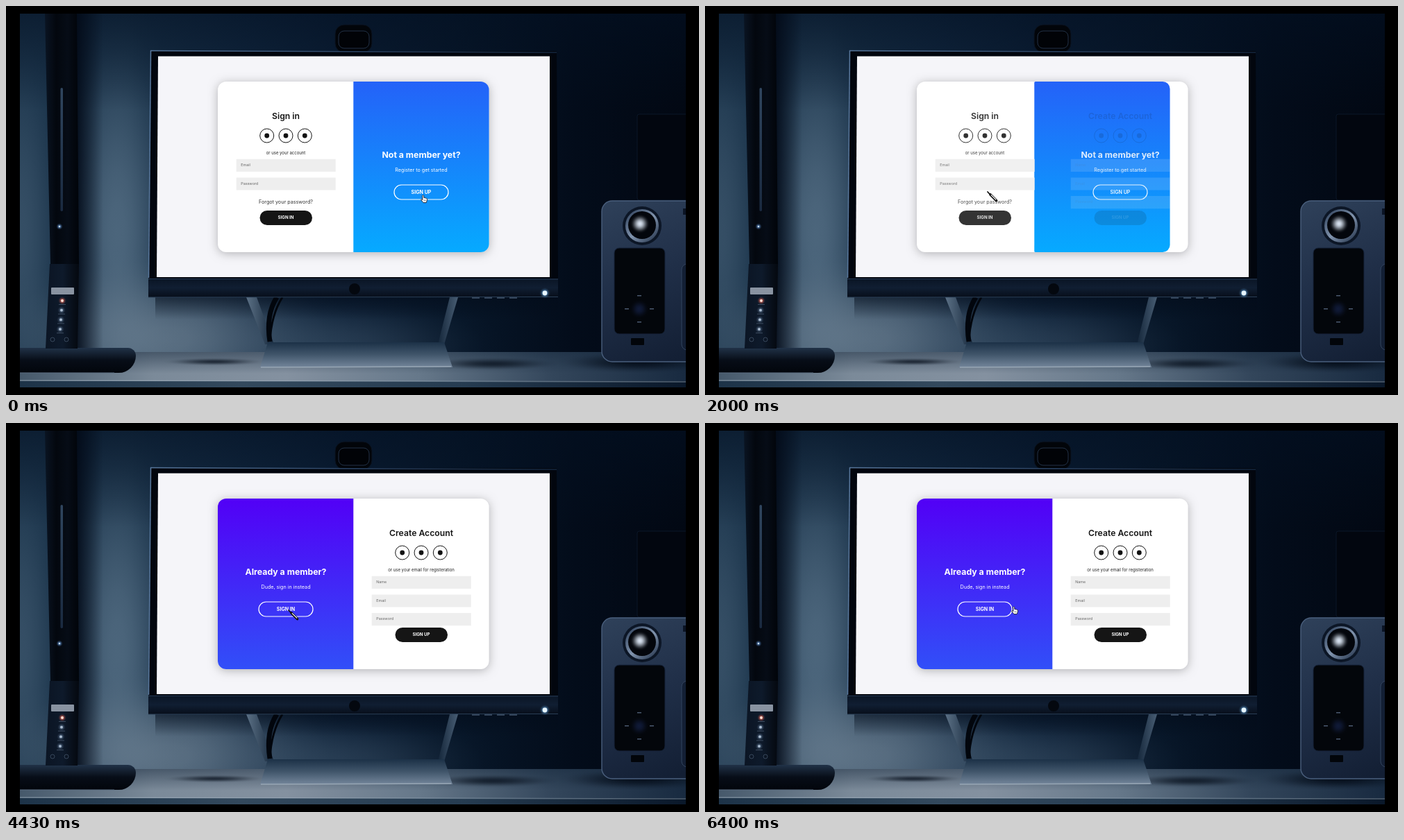
Animation, 998 px wide and 561 px high, one loop 6.43 s. Source, as an HTML page with a canvas:

```html
<!DOCTYPE html>
<html lang="en">
<head>
<meta charset="utf-8">
<title>Sign in / sign up</title>
<style>
html, body { margin: 0; width: 100%; height: 100%; overflow: hidden; background: #000; }
canvas { display: block; width: 998px; height: 561px; }
</style>
</head>
<body>
<canvas id="stage" width="998" height="561"></canvas>
<script>
const W = 998, H = 561, LOOP = 6430, SLIDE = 240;
const ctx = document.getElementById('stage').getContext('2d');
const room = document.createElement('canvas');
room.width = W;
room.height = H;
const g = room.getContext('2d');

// ---------- helpers ----------
function linear(c, x0, y0, x1, y1, ...colors) {
  const grad = c.createLinearGradient(x0, y0, x1, y1);
  colors.forEach((color, i) => grad.addColorStop(i / (colors.length - 1), color));
  return grad;
}
const across = (x0, x1, ...colors) => linear(g, x0, 0, x1, 0, ...colors);
const down = (y0, y1, ...colors) => linear(g, 0, y0, 0, y1, ...colors);

function box(c, fill, x, y, w, h, r = 0) {
  c.beginPath();
  c.roundRect(x, y, w, h, r);
  c.fillStyle = fill;
  c.fill();
}

function outline(c, color, width = 1) {
  c.strokeStyle = color;
  c.lineWidth = width;
  c.stroke();
}

function dot(c, fill, x, y, r) {
  c.beginPath();
  c.arc(x, y, r, 0, 7);
  c.fillStyle = fill;
  c.fill();
}

function line(c, color, width, x0, y0, x1, y1) {
  c.beginPath();
  c.moveTo(x0, y0);
  c.lineTo(x1, y1);
  outline(c, color, width);
}

// four-sided shape with level top and bottom edges
function slab(fill, top, l0, r0, bottom, l1, r1) {
  g.beginPath();
  g.moveTo(l0, top);
  g.lineTo(r0, top);
  g.lineTo(r1, bottom);
  g.lineTo(l1, bottom);
  g.closePath();
  g.fillStyle = fill;
  g.fill();
}

function glow(rgb, alpha, x, y, rx, ry = rx) {
  g.save();
  g.translate(x, y);
  g.scale(rx, ry);
  const grad = g.createRadialGradient(0, 0, 0, 0, 0, 1);
  for (let i = 0; i <= 8; i++) {
    grad.addColorStop(i / 8, `rgba(${rgb},${alpha * (1 + Math.cos(Math.PI * i / 8)) / 2})`);
  }
  g.fillStyle = grad;
  g.fillRect(-1, -1, 2, 2);
  g.restore();
}

function text(str, x, y, size, weight, color, align = 'center') {
  ctx.font = `${weight} ${size}px Inter, sans-serif`;
  ctx.textAlign = align;
  ctx.fillStyle = color;
  ctx.fillText(str, x, y);
}

// ---------- still room ----------
function drawWall() {
  box(g, across(20, 979, '#1b344b', '#1b344b', '#122840', '#0b1d33', '#071628', '#030c1a', '#020813'), 20, 11, 959, 539);
  glow('92,118,140', 0.75, 160, 330, 95, 360);
  glow('92,118,140', 0.4, 20, 330, 70, 330);
  glow('112,132,150', 0.75, 230, 480, 270, 130);
  glow('70,94,116', 0.45, 470, 490, 250, 80);
  box(g, down(11, 150, 'rgba(3,16,34,.6)', 'rgba(3,16,34,0)'), 20, 11, 959, 140);
  box(g, down(418, 452, 'rgba(3,12,26,.6)', 'rgba(3,12,26,0)'), 215, 418, 580, 34);
  box(g, across(100, 140, 'rgba(2,9,22,.9)', 'rgba(2,9,22,0)'), 100, 11, 40, 486);

  box(g, '#02060f', 909, 156, 90, 124, 3);
  outline(g, '#0b1728');
}

function drawDesk() {
  box(g, across(20, 979, '#46596b', '#7b8a99', '#8491a0', '#66788a', '#33465b', '#182a40'), 20, 499, 959, 51);
  box(g, down(499, 530, 'rgba(20,38,58,.5)', 'rgba(20,38,58,0)'), 20, 499, 959, 31);
  box(g, across(20, 979, '#1d3348', '#33495d', '#263c51', '#0a182a'), 20, 541, 959, 9);
  line(g, 'rgba(170,186,200,.45)', 1.5, 20, 540, 979, 542);
  glow('4,12,24', 0.7, 300, 513, 75, 6);
  glow('4,12,24', 0.7, 700, 516, 100, 10);
  glow('4,12,24', 0.85, 910, 514, 120, 16);
}

function drawLamp() {
  box(g, down(492, 530, '#22344a', '#070d17', '#02050b'), -10, 493, 197, 36, [0, 14, 30, 0]);
  line(g, '#5a6d80', 1, 20, 529, 156, 529);
  slab(across(56, 105, '#0a1422', '#03070e', '#060c16', '#010409'), 11, 56, 102, 372, 64, 105);
  slab(across(58, 105, '#0b1524', '#0e1a2b', '#04080f'), 372, 63, 105, 494, 57, 103);
  box(g, down(118, 296, '#30465f', '#1a2a40'), 78.5, 118, 3.5, 178, 2);
  glow('120,180,255', 0.7, 77, 318, 5);
  dot(g, '#cfe4ff', 77, 318, 1.2);
  box(g, '#8993a1', 65, 406, 33, 10, 1);
  for (let i = 0; i < 4; i++) {
    const x = 81 - i, y = 425 + i * 13.7;
    glow(i ? '150,180,215' : '255,110,90', i ? 0.5 : 0.8, x, y, 6);
    dot(g, i ? '#aebfd2' : '#ffe2d8', x, y, 1.9);
    box(g, '#3c4b5f', x - 5, y + 5, 10, 1);
  }
  for (const x of [67, 87]) {
    g.beginPath();
    g.arc(x, 481, 3, 0, 7);
    outline(g, '#38485c');
  }
}

function drawSpeaker() {
  box(g, linear(g, 858, 281, 960, 513, '#2f415a', '#202f48', '#131f34'), 858, 281, 150, 232, 15);
  outline(g, '#4a5f7d', 1.4);
  dot(g, '#0c1626', 916, 317, 28);
  dot(g, linear(g, 895, 295, 938, 342, '#30425c', '#8093ad', '#1c2b42'), 916, 317, 24);
  dot(g, '#03060c', 916, 316, 20);
  glow('225,236,250', 0.95, 913, 314, 14);
  box(g, '#03060b', 876, 349, 73, 124, 7);
  outline(g, '#16233a');
  glow('35,55,120', 0.4, 912, 437, 14);
  for (const [dx, dy] of [[0, -19], [-18, 0], [18, 0], [0, 19]]) {
    box(g, '#4a596f', 909 + dx, 436 + dy, 6, 1.5);
  }
  box(g, '#02050a', 900, 479, 19, 10, 1);
  box(g, '#0b1424', 975, 292, 8, 9);
  box(g, '#131f34', 973, 372, 20, 124, 8);
  outline(g, '#33445e');
}

function drawStand() {
  slab(across(347, 385, '#5a6f84', '#16283c'), 420, 346, 361, 488, 373, 386);
  slab(across(622, 652, '#14263a', '#4a5f75'), 420, 639, 651, 488, 622, 631);
  for (const [x, width] of [[390, 7], [398, 3]]) {
    g.beginPath();
    g.moveTo(x, 420);
    g.quadraticCurveTo(x - 16, 445, 380, 484);
    outline(g, '#02060d', width);
  }
  slab(down(485, 521, '#1c3147', '#41566b', '#73859a'), 485, 377, 631, 521, 366, 643);
  line(g, '#97a6b4', 1.5, 367, 521, 641, 520);
}

function drawMonitor() {
  box(g, '#02050a', 474, 27, 53, 40, 13);
  outline(g, '#0a1423');
  box(g, '#010307', 479, 36, 44, 25, 8);
  outline(g, '#223146');

  slab('#02060e', 65, 208, 793, 395, 205, 795);
  line(g, '#58779c', 1.6, 205.5, 392, 208.5, 64);
  line(g, across(208, 793, '#58779c', '#2a4262', '#14263e'), 1.4, 208, 64.5, 793, 67);
  slab(down(393, 420, '#0a1525', '#101e32', '#070e1a'), 393, 205, 795, 420, 205, 795);
  line(g, '#263a54', 1, 205, 393.5, 795, 394);
  line(g, '#2b4058', 1, 205, 420, 795, 419.5);
  dot(g, '#04080f', 502, 408, 8);
  for (let i = 0; i < 4; i++) box(g, '#33445a', 671 + i * 18, 420, 11, 2);
  glow('110,190,255', 0.8, 776, 414, 8);
  dot(g, '#e8f6ff', 776, 414, 3.4);

  slab('#f5f5f9', 72.5, 219, 783, 391, 217, 783);
  g.save();
  g.shadowColor = 'rgba(0,0,0,.28)';
  g.shadowBlur = 14;
  g.shadowOffsetY = 2;
  box(g, '#fff', 305, 109, 390.6, 246, 12);
  g.restore();
}

function drawRoom() {
  box(g, '#000', 0, 0, W, H);
  g.save();
  g.beginPath();
  g.rect(20, 11, 959, 539);
  g.clip();
  drawWall();
  drawDesk();
  drawSpeaker();
  drawLamp();
  drawStand();
  drawMonitor();
  g.restore();
}

// ---------- card ----------
const HALF = 195.3;

function form(cx, alpha, title, hint, fields, button, note) {
  ctx.globalAlpha = alpha;
  text(title, cx, 162.5, 12.2, 600, '#151515');
  for (const dx of [-27.3, 0, 27.3]) {
    ctx.beginPath();
    ctx.arc(cx + dx, 187, 10, 0, 7);
    outline(ctx, '#151515');
    dot(ctx, '#111', cx + dx, 187, 3.4);
  }
  text(hint, cx, 213.8, 6, 400, '#222');
  fields.forEach((name, i) => {
    const y = 220.8 + i * 26.6;
    box(ctx, '#eee', cx - 71.3, y, 143, 18.2);
    text(name, cx - 64.8, y + 10.1, 5.4, 400, '#666', 'left');
  });
  if (note) text(note, cx, 284.6, 7.2, 400, '#333');
  box(ctx, '#151515', cx - 37.5, 295, 75.5, 21, 10.5);
  text(button, cx, 307.4, 6.2, 700, '#fff');
  ctx.globalAlpha = 1;
}

function invite(cx, alpha, title, line2, button) {
  ctx.globalAlpha = alpha;
  text(title, cx, 218.6, 12.3, 700, '#fff');
  text(line2, cx, 239.4, 7.2, 400, '#fff');
  ctx.beginPath();
  ctx.roundRect(cx - 39, 258, 78, 21, 10.5);
  outline(ctx, '#fff', 1.2);
  text(button, cx, 270.9, 7.1, 700, '#fff');
  ctx.globalAlpha = 1;
}

const flips = [712, 1906, 3245, 4512, 5792];

// right: 1 when the panel rests on the right half, 0 on the left
function panelState(t) {
  const n = flips.filter(f => f <= t).length;
  const toRight = n % 2 === 0;
  const k = n ? Math.min(1, (t - flips[n - 1]) / SLIDE) : 1;
  const p = 1 - (1 - k) ** 4;
  return { toRight, right: toRight ? p : 1 - p };
}

function drawCard(t) {
  const { toRight, right } = panelState(t);
  const colors = toRight ? ['#2462f8', '#06aaff'] : ['#5200f6', '#314ff8'];
  const rl = 12 * (1 - right), rr = 12 * right;
  box(ctx, linear(ctx, 0, 109, 0, 355, ...colors), 305 + HALF * right, 109, HALF, 246, [rl, rr, rr, rl]);
  invite(403, 1 - right, 'Already a member?', 'Dude, sign in instead', 'SIGN IN');
  invite(598, right, 'Not a member yet?', 'Register to get started', 'SIGN UP');
  form(403, right, 'Sign in', 'or use your account', ['Email', 'Password'], 'SIGN IN', 'Forgot your password?');
  form(598, 1 - right, 'Create Account', 'or use your email for registeration',
    ['Name', 'Email', 'Password'], 'SIGN UP');
}

// ---------- pointer ----------
const moves = [
  { at: 1090, ms: 540, x: 406, y: 269 },
  { at: 1750, ms: 20, x: 406, y: 267 },
  { at: 2090, ms: 480, x: 606, y: 269 },
  { at: 3180, ms: 20, x: 608, y: 271 },
  { at: 3600, ms: 630, x: 406, y: 269 },
  { at: 4580, ms: 420, x: 551, y: 238 },
  { at: 5000, ms: 200, x: 603, y: 271 },
  { at: 5200, ms: 130, x: 597, y: 264 },
  { at: 6180, ms: 220, x: 441, y: 264 }
];

function pointerAt(t) {
  let x = 597, y = 272;
  for (const m of moves) {
    const k = Math.max(0, Math.min(1, (t - m.at) / m.ms));
    const e = (k + k * k * (3 - 2 * k)) / 2;
    x += (m.x - x) * e;
    y += (m.y - y) * e;
  }
  return [x, y];
}

const hand = new Path2D('M2.6 1.4Q3.6 0 4.6 1.4L4.9 4.6Q6 4 6.7 5Q7.8 4.5 8.4 5.5' +
  'Q9.6 5.4 9.6 6.8L9 9.4L8.2 11.6H4L0.9 7.9Q0.3 6.6 1.6 6.7L3 7.6Z');

function drawPointer(t) {
  ctx.save();
  ctx.translate(...pointerAt(t));
  if (t >= 730 && t < 5015) {
    ctx.lineCap = 'round';
    line(ctx, '#111', 1.8, 1, 1, 6, 6.5);
    line(ctx, '#111', 3.6, 5, 5, 13.5, 13.6);
    line(ctx, '#fff', 1.2, 6.2, 5.6, 12.8, 12.2);
  } else {
    ctx.fillStyle = '#fff';
    ctx.fill(hand);
    ctx.strokeStyle = '#1b1b28';
    ctx.lineWidth = 0.9;
    ctx.stroke(hand);
    for (const x of [5.2, 7]) line(ctx, '#1b1b28', 0.6, x, 7.4, x, 9.4);
  }
  ctx.restore();
}

function frame() {
  const t = performance.now() % LOOP;
  ctx.drawImage(room, 0, 0);
  drawCard(t);
  drawPointer(t);
  requestAnimationFrame(frame);
}

drawRoom();
frame();
</script>
</body>
</html>
```
